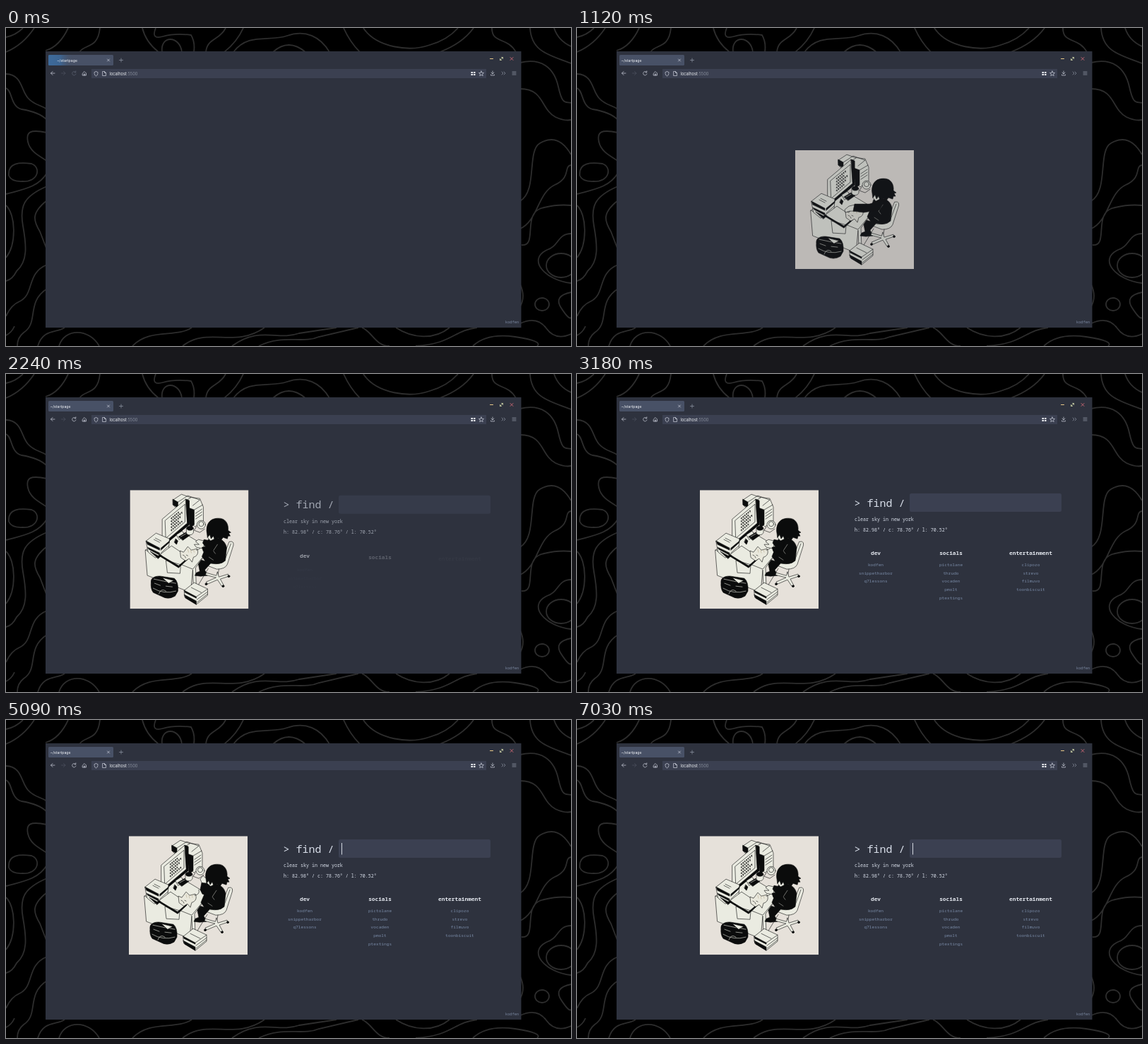
An HTML page that plays this animation: 800 by 450 pixels, repeating every 7180 ms.

```html
<!DOCTYPE html>
<html lang="en">
<head>
<meta charset="utf-8">
<title>~/startpage</title>
<style>
  html, body { margin: 0; width: 100%; height: 100%; overflow: hidden; background: #000; }
  svg { display: block; width: 100vw; height: 100vh; }
  .ui { font-family: Inter, "Open Sans", sans-serif; }
  .mono { font-family: "Noto Sans Mono", "DejaVu Sans Mono", monospace; white-space: pre; }
  .contours path, .contours ellipse { fill: none; stroke: #2d2d2d; stroke-width: 1.8; }
  .icon { fill: none; stroke: #c4c9d4; stroke-width: .75; stroke-linecap: round; stroke-linejoin: round; }
  .art { stroke: #0b0c0c; stroke-width: .6; stroke-linejoin: round; stroke-linecap: round; }
  .p { fill: #eaebe1; }
  .k { fill: #0b0c0c; }
  .n { fill: none; }
  .w { fill: none; stroke: #eaebe1; }
</style>
</head>
<body>
<svg viewBox="0 0 800 450" xmlns="http://www.w3.org/2000/svg">
  <defs>
    <linearGradient id="glow"><stop offset="0" stop-color="#3d6b9c"/><stop offset=".18" stop-color="#3d6592"/><stop offset=".38" stop-color="#485166" stop-opacity="0"/></linearGradient>
    <clipPath id="frame"><path d="M0 0H168V168H0Z"/></clipPath>
  </defs>
  <rect width="800" height="450"/>
  <g class="contours">
    <path d="M0 34Q24 24 40 0M0 13Q14 10 24 0M56 32Q76 26 88 0M104 34C112 22 130 30 133 0M193 0Q198 20 216 34M212 0Q205 17 222 12T262 10Q268 20 266 34M221 34C218 10 246 10 249 34"/>
    <path d="M311 0C302 18 285 14 283 34M336 0Q327 20 309 34M322 34C343 6 372 20 398 11S445 12 458 34M378 34Q400 14 424 34M478 0Q487 20 501 34M506 0C524 28 572 34 600 24Q625 17 640 0M614 34Q646 22 662 0M688 0C688 23 710 12 722 34"/>
    <path d="M742 0C744 34 769 38 800 50M776 0Q782 18 800 26M728 49C758 42 776 56 782 83S792 104 800 106M728 86C762 86 757 115 778 126Q791 132 800 130"/>
    <path d="M728 245C753 230 737 174 756 163S789 160 800 179M728 284C753 273 753 233 777 222S789 196 800 194M730 307C753 310 731 263 758 255Q780 249 800 251M800 291C781 291 783 309 766 314C737 328 764 357 800 361M728 363Q736 380 728 394M800 374Q775 379 786 396T800 410M728 418Q752 407 765 425T800 433"/>
    <ellipse cx="786" cy="336" rx="21" ry="17"/><ellipse cx="759" cy="391" rx="10" ry="9"/>
    <path d="M0 65C23 66 21 88 31 99S48 108 58 115M0 85C9 88 6 111 22 115Q47 119 58 130M58 148C34 143 28 147 31 161S47 181 58 188M4 209C2 190 20 190 36 192C50 197 46 218 24 217Q8 218 4 209"/>
    <path d="M0 235C21 229 46 226 58 205M58 224C25 238 19 252 24 280S31 330 15 344Q9 356 0 358M58 244C35 262 39 273 48 288T58 314M0 251C14 264 15 306 0 325M58 335C28 347 41 377 19 387Q7 392 0 408M58 369C28 388 47 417 25 431Q16 438 16 450M0 435Q8 431 12 422"/>
    <path d="M45 450C53 425 72 432 83 424M75 450C83 424 118 425 132 450M179 450C204 424 241 439 263 424M250 450C286 422 323 454 366 424M320 450C360 421 384 443 415 432T468 424M358 450C391 433 421 447 443 437T499 424M504 424C519 430 523 450 543 450M552 424C575 439 606 442 628 424M580 450C632 447 633 428 667 424M661 450Q681 431 721 437T752 450"/>
  </g>

  <rect x="56" y="33" width="673.5" height="391" fill="#2e323e"/>
  <rect x="60" y="38" width="92" height="15" rx="1.5" fill="#485166"/>
  <rect id="burst" x="60" y="38" width="92" height="15" rx="1.5" fill="url(#glow)"/>
  <g class="ui" font-size="5.2" fill="#f1f3f7">
    <text id="tab" y="47.5">~/startpage</text>
    <path d="M121 58H680V71H121Z" fill="#3b4051"/>
    <text x="146.5" y="66.6" font-size="5.7">localhost<tspan fill="#878d9b">:5500</tspan></text>
  </g>
  <g class="icon">
    <path d="M143.500 44l3 3m0-3l-3 3"/>
    <path d="M160.500 45.500h5m-2.500-2.500v5" stroke="#8c93a2"/>
    <path d="M685.500 43.500h4" stroke="#ebcb8b" stroke-width="1"/>
    <path d="M699.500 45.500l4-4m-2 0h2v2m-4 0v2h2" stroke="#d9dfb1"/>
    <path d="M714 41.500l4 4m0-4l-4 4" stroke="#cf6874" stroke-width=".9"/>
    <path d="M69 64h-5.500m2.500-2.500l-2.500 2.500 2.500 2.500"/>
    <path d="M78.500 64h5.500m-2.500-2.500l2.500 2.500-2.500 2.500" stroke="#4b515f"/>
    <path id="reload" d="M98.500 62.500A2.700 2.700 0 1 0 99 65M98.800 60.800v2h-2"/>
    <path d="M108.500 64l2.500-2.500 2.500 2.500v3h-5zM110.300 67v-2h1.400v2M127.500 61.500q1.500 1 2.500 1c0 3-.5 4.500-2.500 5.500c-2-1-2.500-2.500-2.500-5.500q1 0 2.500-1M137 61.500h2.500l2 2v4h-4.500zM139.500 61.500v2h2"/>
    <path d="M658.500 62h2.500v2h-2.500zm3.500 0h2.500v2h-2.500zm-3.500 3h2.500v2h-2.500zm3.500 0h2.500v2h-2.500z" fill="#f1f3f7" stroke="none"/>
    <path d="M673 61l1 2.300 2.500.2-1.900 1.600.6 2.500-2.200-1.300-2.200 1.300.6-2.500-1.900-1.600 2.500-.2zM689 61v4m-2-2l2 2 2-2m-4.500 3v1h5v-1"/>
    <path d="M702 62l2 2-2 2m3-4l2 2-2 2M717 62h5m-5 2h5m-5 2h5" stroke="#8f96a5"/>
  </g>

  <g id="picture" clip-path="url(#frame)" class="art">
    <path d="M0 0H168V168H0Z" fill="#e6e1da" stroke="none"/>
    <!-- computer tower and papers -->
    <path class="p" d="M61 14L73 6L84 10L99 12L104 24L104 44L92 52L62 22Z"/>
    <path class="k" d="M61 13L68 17V25L61 21ZM83 25L91 28V49L85 54Z"/>
    <path class="n" d="M68 17L82 8L99 14L89 22M72 19L86 11M91 28L103 21M93 33L102 27M93 37L102 31M93 41L102 35"/>
    <!-- desk -->
    <path class="p" d="M22 85L70 57L113 83L93 110L94 139L90 140L89 113L86 145L25 121Z"/>
    <path class="n" d="M22 85L89 112L113 83M94 139L111 111"/>
    <!-- monitor -->
    <path class="p" d="M46 41L79 13L84 15V49L50 76L46 74Z"/>
    <path class="k" d="M79 13L84 15V49L50 77L48 75L81 47Z"/>
    <path class="p" d="M50 43L78 20V45L51 68Z"/>
    <path id="screen" class="n" stroke-width=".9"/>
    <path class="p" d="M66 63L74 58L78 64L70 70Z"/>
    <path class="k" d="M69 66L79 60L85 64L75 71ZM65 69L68 72L66 77L63 74Z"/>
    <path class="n" stroke="#eaebe1" d="M72 66l7-4"/>
    <path class="p" d="M80 54V61C82 65 89 64 90 60V54Z"/><ellipse class="k" cx="85" cy="54" rx="4.500" ry="3"/>
    <circle class="p" cx="101" cy="49" r="6"/><circle class="n" cx="101" cy="48" r="3.500"/><path class="n" d="M94 52l-3 5l8 3l7-5"/>
    <!-- books and loose sheets on the desk -->
    <path class="p" d="M23 72L37 61L56 69L55 84L36 96L26 88Z"/>
    <path class="k" d="M23 72L42 82V85L25 77ZM25 81L42 89V92L27 84ZM44 82L56 72V74L44 85ZM29 87L40 93L52 86L40 97Z"/>
    <path class="n" d="M36 68l8 4m-10-2l8 4M44 89L55 79"/>
    <path class="p" d="M43 91L59 79L83 95L69 109ZM51 100L53 117L71 118L72 106Z"/>
    <path class="k" d="M43 92L69 107L82 96L82 98L69 110L43 94Z"/>
    <g id="cat">
      <path fill="#e9e8dc" d="M72 95L71 86L76 88L82 80L87 85L95 83C98 89 95 94 90 95L88 102L84 97L79 100Z"/>
      <path class="n" stroke="#b8ab91" d="M82 84l1 4m3-3l1 4m3-5l1 4"/>
      <path class="n" d="M75 92l2 1m3-1l2 1m-4 1l1 2M94 85q8-1 6-8"/>
    </g>
    <!-- chair and person -->
    <path class="p" d="M141 73Q150 71 145 83L138 105Q135 112 123 112L107 106L108 100L129 101Z"/>
    <path class="n" d="M143 76L134 100Q130 106 115 104M126 112L124 124"/>
    <path class="k" d="M101 99L115 103L106 113L110 121L100 122L92 121L94 117L99 115L97 105Z"/>
    <path class="k" d="M111 70C120 65 135 68 137 82L135 100Q126 108 107 101L102 94L107 82Z"/>
    <path class="w" d="M124 77l-6 9l3 4M112 95l6 4" stroke-width=".45"/>
    <path class="p" d="M124 116L126 123L139 119L140 122L128 126L133 135L130 136L124 127L110 133L108 130L122 124L107 120L108 117L122 121Z"/>
    <circle class="k" cx="108" cy="133" r="1.500"/><circle class="k" cx="132" cy="136" r="1.500"/><circle class="k" cx="140" cy="122" r="1.500"/>
    <path class="p" d="M111 60L110 67L114 72L120 69L119 56Z"/>
    <path class="k" d="M109 61C107 49 113 40 124 40C136 39 140 49 139 57L143 60L140 61L142 65L139 65L138 69L132 67L129 71L125 68L120 70L118 65L115 69L113 63L110 67Z"/>
    <path id="hand" class="p"/><path id="sleeve" class="k"/>
    <!-- bag and books on the floor -->
    <path class="k" d="M30 130C29 124 37 121 44 122L63 125Q69 130 68 143L64 150Q54 156 44 150L33 145Q29 140 30 130Z"/>
    <path class="w" d="M34 126Q47 129 65 132M33 139Q48 148 65 143M41 147Q44 138 51 143M35 132l8 3m8 1l9 1"/>
    <path d="M46 124L62 128L55 132Z" class="p"/>
    <path class="p" d="M77 142L91 131L110 140L110 149L94 162L78 152Z"/>
    <path class="k" d="M77 142L94 151V153L78 145ZM77 148L94 157V162L79 153Z"/>
    <path class="n" d="M94 151L110 140M95 155L110 144M95 159L110 147M87 138L101 145"/>
  </g>

  <g id="content" class="mono"></g>
  <path id="caret" d="M475.500 174V190.500" stroke="#e5e9f0" stroke-width=".9"/>
  <text class="mono" x="707" y="417.700" font-size="5.300" fill="#7b88a1">kodfen</text>
</svg>
<script>
const LOOP = 7180;
const $ = id => document.getElementById(id);
const clamp = v => Math.max(0, Math.min(1, v));

// Equivalent of CSS cubic-bezier(), solved by bisection.
const bezier = (x1, y1, x2, y2) => x => {
  if (x <= 0 || x >= 1) return clamp(x);
  const at = (a, b, u) => 3 * a * u * (1 - u) ** 2 + 3 * b * u * u * (1 - u) + u ** 3;
  let lo = 0, hi = 1;
  for (let i = 0; i < 24; i++) {
    const mid = (lo + hi) / 2;
    if (at(x1, x2, mid) < x) lo = mid; else hi = mid;
  }
  return at(y1, y2, lo);
};
const ease = bezier(.25, .1, .25, 1);
const glide = bezier(.4, 0, .2, 1);
const progress = (t, start, length, curve = ease) => curve((t - start) / length);

const text = (str, x, y, size, fill, extra = '') =>
  `<text x="${x}" y="${y}" font-size="${size}" fill="${fill}" ${extra}>${str}</text>`;

const reveals = [];
function addReveal(start, markup) {
  const g = document.createElementNS('http://www.w3.org/2000/svg', 'g');
  g.innerHTML = markup;
  $('content').append(g);
  reveals.push({ g, start });
}

addReveal(2045,
  text('&gt; find /', 392.5, 187.5, 15, '#d8dee9') +
  '<rect x="471" y="169" width="215" height="26" rx="2.5" fill="#3b4051"/>' +
  text('clear sky in new york', 393, 208.3, 6.67, '#d8dee9') +
  text('h: 82.98° / c: 78.76° / l: 70.52°', 393, 223.3, 6.67, '#d8dee9'));

const columns = [
  [423, 2070, 'dev', 'kodfen snippetharbor q7lessons'],
  [529.5, 2150, 'socials', 'pictolane thrudo vocaden pmolt ptextings'],
  [642.5, 2220, 'entertainment', 'clipozo strevo filmuvo toonbiscuit']
];
for (const [x, start, title, links] of columns) {
  addReveal(start, text(title, x, 256.4, 7.8, '#e5e9f0', 'text-anchor="middle" font-weight="700"'));
  links.split(' ').forEach((name, i) => addReveal(start + 130 + i * 10,
    text(name, x, 271.8 + i * 11.7, 6.15, '#7889a5', 'text-anchor="middle"')));
}

const poses = {
  type: { hand: 'M105 72L97 70L93 73L98 77L91 77L94 81L104 83Z', sleeve: 'M119 73L105 70L103 75L107 80L102 81L104 87L117 88Z' },
  up: { hand: 'M104 68L101 61L105 56L109 60L110 67Z', sleeve: 'M119 74L111 67L103 66L101 76L104 82L117 86Z' },
  reach: { hand: 'M84 77L76 79L70 84L71 88L77 86L84 86Z', sleeve: 'M126 70L105 76L84 76L82 86L97 88L120 84Z' }
};

function poseAt(t) {
  const phase = t % 3450;
  if (phase >= 700 && phase < 1400) return 'reach';
  return phase >= 1400 && phase < 1900 ? 'up' : 'type';
}

// Slanted rows of code, with row lengths that change as it is typed.
function screenRows(step) {
  let d = '';
  for (let row = 0; row < 5; row++) {
    const words = 5 + (row * 2 + step) % 3;
    for (let i = 0; i < words; i++)
      d += `M${58 + i * 2.4} ${40 + row * 4.2 - i * 2}l1.2 -1v2`;
  }
  return d;
}

function render(t) {
  const loaded = progress(t, -60, 390);
  $('tab').setAttribute('x', 72.5 - 9.7 * clamp((loaded - .17) / .83));
  $('burst').setAttribute('opacity', 1 - clamp(t / 330));
  $('reload').setAttribute('stroke', t < 610 ? '#5b6170' : '#c4c9d4');

  const appear = progress(t, 820, 640);
  const x = 309 - 135 * progress(t, 1420, 950, glide);
  const y = 164.2 + 39 * (1 - appear);
  $('picture').setAttribute('transform', `translate(${x} ${y})`);
  $('picture').setAttribute('opacity', appear);

  const pose = poseAt(t);
  const beat = Math.floor(t / 120);
  const tap = pose === 'type' && beat % 2 ? 'translate(-.6 1)' : '';
  $('hand').setAttribute('d', poses[pose].hand);
  $('hand').setAttribute('transform', tap);
  $('sleeve').setAttribute('d', poses[pose].sleeve);
  $('cat').setAttribute('transform', pose === 'up' ? 'translate(-1 -1)' : '');
  $('screen').setAttribute('d', screenRows(Math.floor(beat / 2)));

  for (const { g, start } of reveals) {
    const p = progress(t, start, 500);
    g.setAttribute('opacity', p);
    g.setAttribute('transform', `translate(0 ${8 * (1 - p)})`);
  }
  const caretOn = t >= 3360 && (t - 3360) % 1200 < 600;
  $('caret').setAttribute('visibility', caretOn ? 'visible' : 'hidden');
}

const begin = performance.now();
function tick() {
  render((performance.now() - begin) % LOOP);
  requestAnimationFrame(tick);
}
tick();
</script>
</body>
</html>
```
